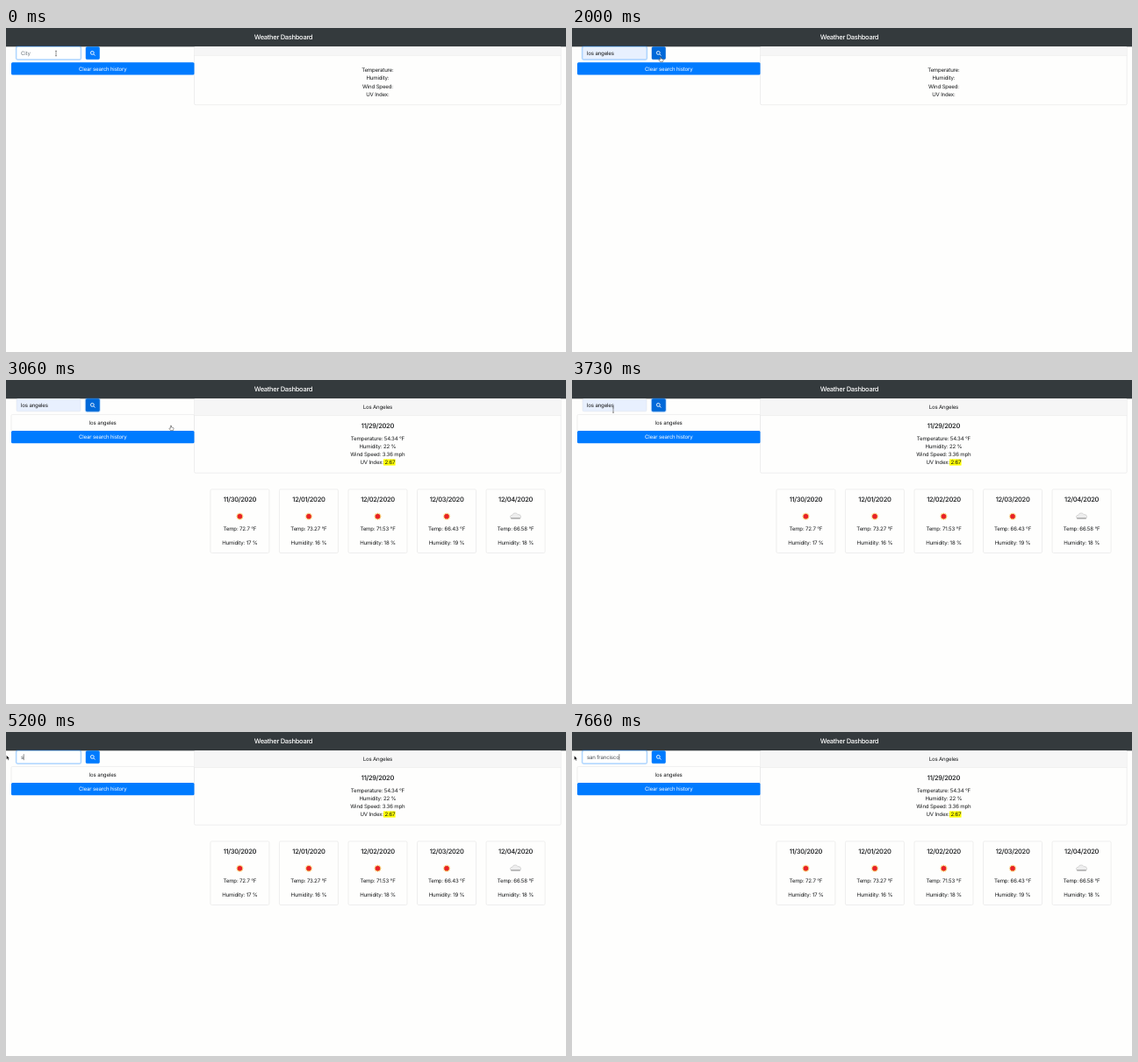
Write an HTML page that moves like this. It is 638 px wide and 370 px high and loops after 8000 ms.

```html
<!DOCTYPE html>
<html lang="en">
<head>
<meta charset="utf-8">
<title>Weather Dashboard</title>
<style>
  html, body { margin: 0; height: 100%; overflow: hidden; background: #fefefd; }
  svg { display: block; width: 638px; height: 370px; }
  text { font: 6.1px Inter, sans-serif; letter-spacing: -.17px; fill: #151719; text-rendering: geometricPrecision; white-space: pre; }
  .mid { text-anchor: middle; }
  .big { font-size: 7.55px; font-weight: 500; letter-spacing: -.32px; }
  .light { fill: #fff; }
</style>
</head>
<body>
<svg id="stage" viewBox="0 0 638 370"></svg>
<script>
const LOOP = 8000;
const stage = document.getElementById('stage');
const BLUE = '#007bff', LINE = '#dfdfdf';

// Moments at which the page changes
const HOVER = 1800, CLICK = 2150, LISTED = 2200, LOADED = 2330, FORECAST = 2730;
const GRAB = 4050, RETYPE = 5200;

// [time, x, y] of the pointer tip
const pointer = [
  [60, 57, 29], [330, 94, 42], [600, 94, 42], [1060, 105, 45], [1460, 105, 45],
  [1900, 101, 33], [2150, 101, 33], [2460, 188, 52], [3330, 188, 52], [3730, 47, 34.5],
  [4050, 50, 29], [4400, 34, 29], [4900, 0.5, 26.5], [5960, 0.5, 26.5], [6060, 2.5, 27]
];

// [time, value] of the search field
const typed = [[-600, ''], [200, 'l'], [600, 'lo'], [800, 'los'], [1020, 'los angeles']];
const keyTimes = [5200, 5330, 5800, 6030, 6330, 6460, 6660, 6800, 6930, 7260, 7400, 7600, 7660];
keyTimes.forEach((time, i) => typed.push([time, 'san francisco'.slice(0, i + 1)]));

const days = [
  ['11/30/2020', '72.7', 17], ['12/01/2020', '73.27', 16], ['12/02/2020', '71.53', 18],
  ['12/03/2020', '66.43', 19], ['12/04/2020', '66.58', 18]
];

const box = (x, y, w, h, fill, stroke = 'none', r = 0) =>
  `<rect x="${x}" y="${y}" width="${w}" height="${h}" rx="${r}" fill="${fill}" stroke="${stroke}" stroke-width=".5"/>`;
const label = (str, x, y, cls = '') => `<text class="mid ${cls}" x="${x}" y="${y + 2.2}">${str}</text>`;
const path = (d, x, y, attrs) => `<path d="${d}" transform="translate(${x} ${y})" ${attrs}/>`;
const ring = (x, y, w, h) => box(x - 1.2, y - 1.2, w + 2.4, h + 2.4, 'rgba(0,123,255,.25)', 'none', 2.4);

function pointerAt(t) {
  const next = pointer.findIndex(p => p[0] > t);
  if (next === 0) return pointer[0].slice(1);
  if (next < 0) return pointer.at(-1).slice(1);
  const [t0, x0, y0] = pointer[next - 1], [t1, x1, y1] = pointer[next];
  const u = (t - t0) / (t1 - t0), k = u * u * (3 - 2 * u);
  return [x0 + (x1 - x0) * k, y0 + (y1 - y0) * k];
}

function drawPointer(x, y, listBottom) {
  const within = (l, t, r, b) => x >= l && x <= r && y >= t && y <= b;
  if (within(12, 21, 85, 36))
    return path('M-1-3Q0-3 0-2V2Q0 3-1 3M1-3Q0-3 0-2M0 2Q0 3 1 3', x, y, 'fill="none" stroke="#555" stroke-width=".6"');
  if (within(91, 21, 106.5, 36) || within(6, 39, 214.5, listBottom))
    return path('M-.6.2Q0-.4.5.2V2L2.6 2.5Q3.2 2.8 3 3.8L2.4 5.6H-.6L-2 3.4Q-2 2.6-.6 3.2Z', x, y,
      'fill="#fff" stroke="#222" stroke-width=".45" stroke-linejoin="round"');
  return path('M0 0V5L1.2 4L2 5.8L2.9 5.4L2.1 3.7H3.6Z', x, y, 'fill="#000" stroke="#fff" stroke-width=".4"');
}

function drawSun(x, y) {
  let d = '';
  for (let i = 0; i < 24; i++) {
    const a = i * Math.PI / 12, r = i % 2 ? 2.8 : 4.5;
    d += `${i ? 'L' : 'M'}${(r * Math.cos(a)).toFixed(2)} ${(r * Math.sin(a)).toFixed(2)}`;
  }
  return path(d + 'Z', x, y, 'fill="#f3b13c"') + `<circle cx="${x}" cy="${y}" r="2.7" fill="#e8202a"/>`;
}

const drawCloud = (x, y) =>
  path('M-4.5 3Q-6.5 2.7-6 .6Q-5.5-1-3.7-.7Q-2.8-3.7.2-3Q1.8-2.8 2.3-1.5Q5.8-2 6 1Q6 3 4.5 3Z', x, y,
    'fill="#eee" stroke="#bbb" stroke-width=".5"') +
  path('M-5.4 3H5.2', x, y, 'stroke="#777" stroke-width=".8"');

function drawSearch(t, px) {
  const [since, value] = typed.findLast(entry => entry[0] <= t);
  const focused = t < CLICK || t >= GRAB;
  const filled = t >= 1020 && t < RETYPE;
  const active = t >= HOVER && t < GRAB;
  const selecting = t >= GRAB && t < RETYPE;
  let out = focused ? ring(12, 21.5, 73, 14.3) : '';
  out += box(12, 21.5, 73, 14.3, filled ? '#e8f0fe' : '#fff', focused ? '#80bdff' : '#dce3ea', 1.5);
  if (selecting) {
    const left = Math.max(17, Math.min(48, px));
    out += box(left, 25, 48 - left, 7.4, '#b3d7fe');
  }
  const shown = t >= 1020 && t < 1460 ? 'los <tspan text-decoration="underline">angeles</tspan>' : value || 'City';
  const ink = filled ? '#111' : value ? '#495057' : '#6c757d';
  out += `<text id="field" x="17" y="30.9" style="fill:${ink}">${shown}</text>`;
  if (focused && !selecting && (t - since) % 1000 < 500)
    out += `<path id="caret" d="M17.2 25.2V32.2" data-empty="${value ? '' : 1}" stroke="#222" stroke-width=".5"/>`;

  if (t >= CLICK && t < GRAB) out += ring(91, 21.5, 15.5, 14.3);
  out += box(91, 21.5, 15.5, 14.3, active ? '#0069d9' : BLUE, active ? '#0062cc' : BLUE, 1.5);
  out += path('M.9.9L2.6 2.6M1.4-.5A1.9 1.9 0 1 1-2.4-.5A1.9 1.9 0 1 1 1.4-.5', 98.8, 28.9,
    'fill="none" stroke="#fff" stroke-width=".9"');
  return out;
}

function drawCurrent(loaded) {
  const top = loaded ? 40.3 : 31, bottom = loaded ? 106.2 : 87.7, first = loaded ? 66.5 : 48;
  const values = loaded ? [' 54.34 °F', ' 22 %', ' 3.36 mph', ' 2.67'] : ['', '', '', ''];
  let out = box(214.5, 21.5, 417.7, bottom - 21.5, '#fefefd', LINE, 1.5);
  out += box(214.7, 21.5, 417.3, top - 21.5, '#f6f6f6') + box(214.5, top, 417.7, .4, LINE);
  if (loaded) {
    out += label('Los Angeles', 423.4, 31) + label('11/29/2020', 423.4, 52.5, 'big');
    out += box(430, 90.4, 13.6, 7.2, '#ff0');
  }
  ['Temperature:', 'Humidity:', 'Wind Speed:', 'UV Index:'].forEach((name, i) => {
    out += label(name + values[i], 423.4, first + i * 9.15);
  });
  return out;
}

const drawForecast = () => days.map(([date, temp, humidity], i) => {
  const x = 266.4 + i * 78.55;
  return box(x - 33.5, 124.8, 67, 72.7, '#fefefd', LINE, 1.5) +
    label(date, x, 137.2, 'big') +
    (i < 4 ? drawSun(x, 155.8) : drawCloud(x, 155)) +
    label(`Temp: ${temp} °F`, x, 170.2) +
    label(`Humidity: ${humidity} %`, x, 185.4);
}).join('');

function render(t) {
  const [x, y] = pointerAt(t);
  const listed = t >= LISTED, clearY = listed ? 58 : 39.2;
  let out = box(0, 0, 638, 21.3, '#343a3d') + label('Weather Dashboard', 316, 10.7, 'big light');
  out += drawCurrent(t >= LOADED);
  if (listed) out += box(6, 39.4, 208.5, 19, '#fefefd', LINE, 1.5) + label('los angeles', 110.2, 48.6);
  out += box(6, clearY, 208.5, 14.2, BLUE, 'none', 1.5) + label('Clear search history', 110.2, clearY + 7.1, 'light');
  if (t >= FORECAST) out += drawForecast();
  out += drawSearch(t, x) + drawPointer(x, y, clearY + 14.2);
  stage.innerHTML = out;

  const caret = document.getElementById('caret');
  if (caret && !caret.dataset.empty) {
    const width = document.getElementById('field').getComputedTextLength();
    caret.setAttribute('transform', `translate(${width} 0)`);
  }
}

const start = performance.now();
function tick() {
  render((performance.now() - start) % LOOP);
  requestAnimationFrame(tick);
}
tick();
</script>
</body>
</html>
```
